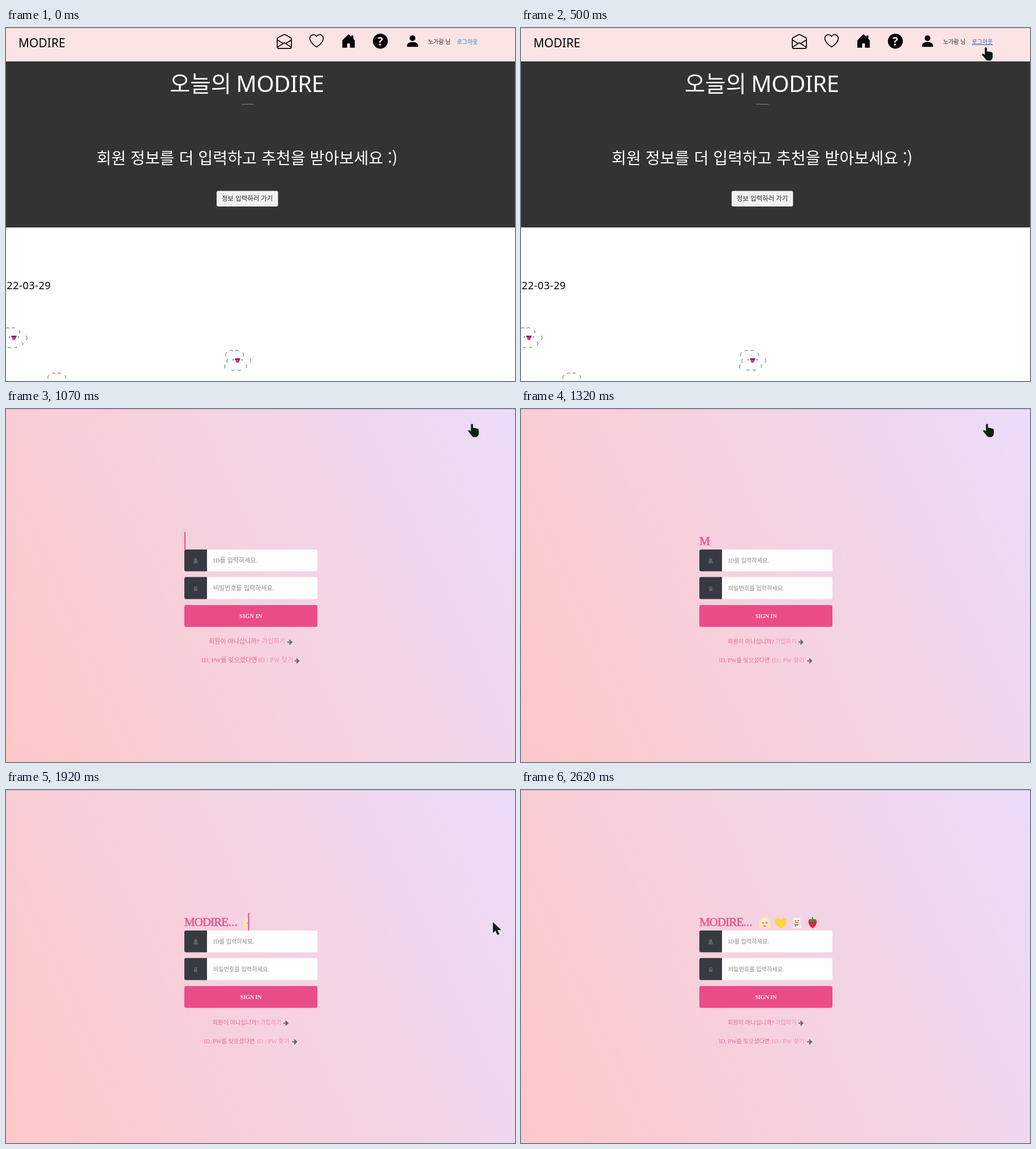
These frames come from a looping animation (899 by 623 pixels, 2710 ms). An HTML page:

```html
<!DOCTYPE html>
<html lang="ko">
<head>
<meta charset="utf-8">
<title>MODIRE</title>
<style>
html, body { margin: 0; width: 100%; height: 100%; overflow: hidden; background: #fefefe; }
svg { display: block; width: 899px; height: 623px; }
.ui { font-family: "Noto Sans CJK KR", "Noto Sans CJK", sans-serif; }
.latin { font-family: "Noto Sans", sans-serif; }
.form { font-family: "Liberation Serif", "Noto Sans CJK KR", "Noto Sans CJK", serif; }
.hover { fill: #1f62b4; text-decoration: underline; }
</style>
</head>
<body>
<svg viewBox="0 0 899 623" xmlns="http://www.w3.org/2000/svg">
  <defs>
    <linearGradient id="sky" gradientUnits="userSpaceOnUse" x1="-38" y1="539" x2="938" y2="84">
      <stop offset="0" stop-color="#fec8c8"/>
      <stop offset="1" stop-color="#ecdcfa"/>
    </linearGradient>
    <clipPath id="typed"><rect id="typedBox" x="315" y="210" width="0" height="38"/></clipPath>
    <g id="sheep">
      <path fill="none" stroke="#555" stroke-width=".9" d="M-14-17q3-3 6 0M-4-17q3-3 6 0M-19-15q-3 3-2 7M9-14q3 3 1 6M-18-4q-2 4 0 8M22-4q3 4 0 8M-22 7q-2 4 0 7M15 7q2 3 0 6M-11 16q3 3 6 0M0 16q3 3 6 0"/>
      <path stroke="#333" d="M-8-3v3M8-3v3"/>
      <path fill="#7a2583" d="M-5-4H5L3.5 0h-7z"/>
      <path fill="#ef2f63" d="M-3-1H3V1q-.5 3-3 3t-3-3z"/>
    </g>
  </defs>

  <g id="home" class="ui">
    <rect width="899" height="623" fill="#fefefe"/>
    <rect width="899" height="59" fill="#fde4e4"/>
    <rect y="59" width="899" height="293" fill="#333"/>
    <rect width="899" height="1" fill="#d8c6c6"/>
    <text class="latin" x="22" y="34" font-size="21">MODIRE</text>
    <g transform="translate(478.3 10.2) scale(1.67)" fill="none" stroke="#000">
      <path d="M.5 5.4a1.5 1.5 0 0 1 .8-1.3l6-3.2a1.5 1.5 0 0 1 1.4 0l6 3.2a1.5 1.5 0 0 1 .8 1.3V14a1.5 1.5 0 0 1-1.5 1.5H2A1.5 1.5 0 0 1 .5 14z"/>
      <path d="M.5 6.5L6.3 10M15.5 6.5L9.7 10M.7 14.2L8 9.5l7.3 4.7"/>
    </g>
    <path transform="translate(534.9 10.1) scale(1.7)" fill="none" stroke="#000" stroke-width=".95" d="M8 2.75l-.72-.74C5.6.28 2.5.88 1.4 3.05c-.5 1-.6 2.5.3 4.4.9 1.8 2.8 4 6.3 6.35 3.5-2.4 5.4-4.55 6.3-6.35.9-1.9.8-3.4.3-4.4C13.5.88 10.4.28 8.7 2.01z"/>
    <path transform="translate(591.5 9.5) scale(1.69)" d="M6.5 15v-4q0-.5.5-.5h2q.5 0 .5.5v4H14q.5 0 .5-.5V7.3L13 5.8V2.5q0-.5-.5-.5h-1q-.5 0-.5.5v1.3L8.4 1.2q-.4-.4-.8 0L1.5 7.3v7.2q0 .5.5.5z"/>
    <circle cx="661.2" cy="23.2" r="13.2"/>
    <text class="latin" x="661.2" y="30.5" font-size="20.5" font-weight="800" text-anchor="middle" fill="#fde4e4">?</text>
    <path transform="translate(704.5 9.5) scale(1.69)" d="M3 14s-1 0-1-1 1-4 6-4 6 3 6 4-1 1-1 1zM8 8a3 3 0 1 0 0-6 3 3 0 0 0 0 6z"/>
    <text x="745.5" y="28" font-size="10" fill="#222">노가람 님</text>
    <text id="logout" x="796.5" y="28" font-size="10" fill="#1583dc">로그아웃</text>

    <g fill="#fff">
      <text x="289" y="113" font-size="39.5">오늘의</text>
      <text class="latin" x="406.5" y="113" font-size="40" letter-spacing="-.4">MODIRE</text>
      <text x="160" y="239.5" font-size="28.2">회원 정보를 더 입력하고 추천을 받아보세요 :)</text>
    </g>
    <path d="M415.5 134.5h22" stroke="#858585"/>
    <rect x="372" y="287.5" width="108.5" height="27.5" rx="3" fill="#f1f2f2"/>
    <text x="426.2" y="305.3" font-size="11.4" text-anchor="middle" fill="#212529">정보 입력하러 가기</text>
    <text class="latin" x="79.5" y="461" font-size="18" letter-spacing=".6" text-anchor="end">2022-03-29</text>
    <use href="#sheep" x="14" y="547"/>
    <use href="#sheep" x="409" y="587"/>
    <use href="#sheep" x="95" y="627"/>
    <circle id="press" cx="822" cy="26" r="9" fill="#ff0" opacity=".47"/>
  </g>

  <g id="login" class="form">
    <rect width="899" height="623" fill="url(#sky)"/>
    <rect width="899" height="1" fill="#cfb8c7"/>
    <g clip-path="url(#typed)">
      <g fill="#ea4c88" stroke="#ea4c88" stroke-width=".45" font-size="21">
        <text x="315" y="240" letter-spacing="-.9">MODIRE</text>
        <text x="392.5" y="240" letter-spacing=".3">...</text>
      </g>
      <g transform="translate(430.5 234.5)">
        <path fill="#fbe8b0" d="M-10 8C-11-2-9-10 0-10S11-2 10 8q0 2-3 2H-7q-3 0-3-2z"/>
        <ellipse cy="1" rx="6.5" ry="7.5" fill="#fbdcc0"/>
        <path fill="#fdf0bf" d="M-7-1Q-5-8 0-8t7 7Q3-2 1-5-2-2-7-1z"/>
        <path stroke="#543" d="M-4.5 0h3M2 0h3"/>
        <path stroke="#d4475b" stroke-width="1.3" d="M-2 5.5h4"/>
      </g>
      <path transform="translate(459 235)" fill="#fcd53a" d="M0 9.5C-7 5-10 1-10-3.500-10-9-3-11 0-5.500 3-11 10-9 10-3.500 10 1 7 5 0 9.500z"/>
      <g transform="translate(487.5 234.5)">
        <path fill="#f4f2ee" d="M-7-9H6V-4L4 1l4 2v7H-7V3l2-2-2-5z"/>
        <path fill="#fbd9bd" d="M-5-5H4V0q-4 4-9 0zM6 1l3-1v5H7z"/>
        <path stroke="#433" d="M-4-4h2.5M1-4h2.5M-3-.5h5"/>
        <path fill="#e0383d" d="M-5 2l4 1 5-1-3 3-2-1-2 3z"/>
      </g>
      <g transform="translate(515 234.5)">
        <path fill="#e7353c" d="M-7.5-3.5Q-5-8 0-6 5-8 7.5-3.5 8 4 0 10-8 4-7.5-3.5z"/>
        <path fill="#239b48" d="M-1-10H1v3l6 1-4 3-3-1.5L-3-3l-4-3 6-1z"/>
        <path stroke="#4a1520" stroke-width="1.8" d="M-5 0h1.5M-1 0h1.5M3.5 0H5M-3 4h1.5M2 4h1.5"/>
      </g>
    </g>
    <rect id="caret" y="217" width="2" height="31" fill="#ea4c88"/>

    <rect x="315" y="248" width="235" height="38.5" rx="3" fill="#fefefe"/>
    <rect x="315" y="296.5" width="235" height="39" rx="3" fill="#fefefe"/>
    <path fill="#363b41" d="M318 248h37v38.5h-37q-3 0-3-3V251q0-3 3-3zM318 296.5h37v39h-37q-3 0-3-3v-33q0-3 3-3z"/>
    <g fill="#606468">
      <circle cx="335" cy="266" r="2.8"/>
      <path d="M331 272.5q0-4.5 2-4.5 2 1.5 4 0 2 0 2 4.5zM332 316.5h6v4.5h-6z"/>
      <path fill="none" stroke="#606468" stroke-width="1.3" d="M333 317v-1.5q0-2 2-2t2 2v1.5"/>
    </g>
    <rect x="315" y="346" width="235" height="38.5" rx="3" fill="#ea4c88"/>
    <g id="labels"></g>
  </g>

  <path id="hand" d="M-1.8 1.5Q0-1.5 1.8 1.5V7.5q2-1 3.2.5 2-1 3.3.6 3.7-.5 3.7 3V17q0 4-4 6.5H2.5q-2.5-1-4.5-4.5L-7 13q.5-2.2 3-1.5l2.2 2z"/>
  <path id="arrow" fill="#0c1f17" d="M0 0V19l4.5-4L8 22.5l3.5-1.5L8 14h7z"/>
</svg>

<script>
const LOOP = 2710, LOGIN = 1070, FONT_READY = 1160, TYPE_START = 1075;
const $ = id => document.getElementById(id);
const show = (el, on) => el.setAttribute("display", on ? "inline" : "none");

// Cursor waypoints: time, x, y
const approach = [[60, 879, 396], [160, 866, 290], [280, 845, 165], [400, 827, 67],
  [500, 821, 34], [560, 822, 28], [690, 823, 26]];
const leave = [[1700, 827, 36], [1800, 846, 112], [1920, 860, 232], [2050, 856, 400],
  [2190, 843, 584], [2230, 841, 603], [2320, 838, 630]];

function along(path, t) {
  let i = 1;
  while (i < path.length - 1 && t > path[i][0]) i++;
  const [t0, x0, y0] = path[i - 1], [t1, x1, y1] = path[i];
  const k = Math.min(1, Math.max(0, (t - t0) / (t1 - t0)));
  return [x0 + (x1 - x0) * k, y0 + (y1 - y0) * k];
}

const label = (x, y, size, fill, text, extra = "") =>
  `<text x="${x}" y="${y}" font-size="${size}" fill="${fill}" ${extra}>${text}</text>`;
const next = (x, y) =>
  `<path d="M${x} ${y}h7m-3.5-4l4 4-4 4" fill="none" stroke="#606468" stroke-width="2.2"/>`;

// Form texts, set wider until the web font is ready
function labels(ready) {
  const size = ready ? 10.2 : 11.1;
  const [join, joinLink, joinArrow] = ready ? [365, 449, 490] : [358, 452, 497];
  const [lost, lostLink, lostArrow] = ready ? [349.5, 443, 505.5] : [345.5, 445, 509.5];
  const pink = "#ec649a", pale = "#f189b3";
  return label(366, 271, size, "#8d8d8d", "ID를 입력하세요.") +
    label(366, 320, size, "#8d8d8d", "비밀번호를 입력하세요.") +
    label(432.5, 369, 10.6, "#f6e9ef", "SIGN IN",
      `font-weight="700" text-anchor="middle" letter-spacing="${ready ? -0.4 : 0}"`) +
    label(join, 413.5, size, pink, "회원이 아니십니까?") +
    label(joinLink, 413.5, size, pale, "가입하기") + next(joinArrow, 411.5) +
    label(lost, 447, size, pink, "ID, PW를 잊으셨다면") +
    label(lostLink, 447, size + 0.5, pale, "ID / PW 찾기") + next(lostArrow, 444.5);
}

let fontState;
function setFont(ready) {
  if (ready === fontState) return;
  fontState = ready;
  $("labels").innerHTML = labels(ready);
}

function drawCursor(t) {
  const [x, y] = along(t < 1700 ? approach : leave, t);
  const pointing = t < 1700 && y < 45;
  for (const id of ["hand", "arrow"]) {
    $(id).setAttribute("transform", `translate(${x} ${y})`);
    show($(id), t >= 60 && t < 2320 && (id === "hand") === pointing);
  }
  $("hand").setAttribute("fill", t < LOGIN ? "#071a1a" : "#0d200f");
  $("logout").setAttribute("class", t >= 60 && pointing ? "hover" : "");
}

function draw(t) {
  const login = t >= LOGIN;
  show($("home"), !login);
  show($("login"), login);
  show($("press"), t >= 870 && t < 930);
  drawCursor(t);
  setFont(t >= FONT_READY);

  const age = t - TYPE_START;
  const width = Math.max(0, Math.floor(age / 125)) * 18.75;
  $("typedBox").setAttribute("width", width);
  $("caret").setAttribute("x", 315 + width);
  show($("caret"), age < 0 || age % 500 >= 250);
}

const start = performance.now();
function tick() {
  draw((performance.now() - start) % LOOP);
  requestAnimationFrame(tick);
}
tick();
</script>
</body>
</html>
```
